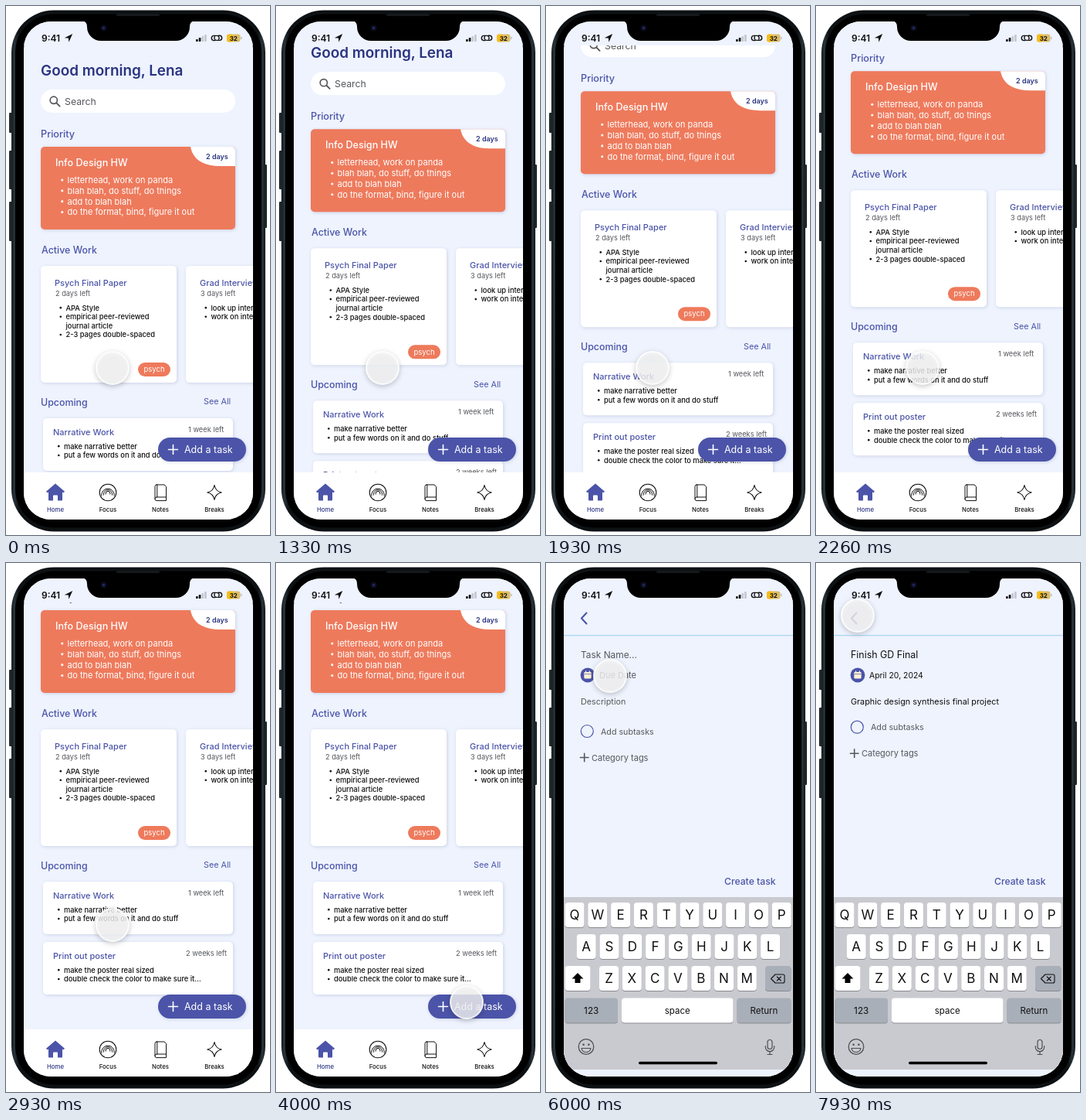
An HTML page that plays this animation: 342x684 px, repeating every 8 s.

```html
<!DOCTYPE html>
<html lang="en">
<head>
<meta charset="utf-8">
<title>Task planner demo</title>
<style>
html, body { margin: 0; width: 100%; height: 100%; overflow: hidden; background: #fff; }
svg { display: block; width: 100%; height: 100%; }
text { font-family: Inter, "Open Sans", sans-serif; white-space: pre; }
.card { filter: drop-shadow(1px 1.5px 2px rgba(70, 80, 130, .2)); }
.key { filter: drop-shadow(0 1px 0 #898b90); }
#touch { filter: drop-shadow(0 2px 3px rgba(0, 0, 0, .25)); }
</style>
</head>
<body>
<svg viewBox="0 0 342 684" xmlns="http://www.w3.org/2000/svg">
  <defs>
    <clipPath id="screen"><rect x="23" y="20" width="297" height="644" rx="35"/></clipPath>
    <linearGradient id="metal">
      <stop offset="0" stop-color="#161d20"/><stop offset=".012" stop-color="#29343a"/>
      <stop offset=".03" stop-color="#0d1113"/><stop offset=".97" stop-color="#0d1113"/>
      <stop offset=".988" stop-color="#29343a"/><stop offset="1" stop-color="#161d20"/>
    </linearGradient>
  </defs>
  <g id="body"></g>
  <g clip-path="url(#screen)">
    <rect x="23" y="20" width="297" height="644" fill="#eef3fe"/>
    <g id="home"><g id="feed"></g><g id="chrome"></g></g>
    <g id="task"></g>
  </g>
  <g id="status"></g>
  <g id="touch">
    <circle r="21" fill="#f8f8f8" fill-opacity=".8" stroke="#fff" stroke-opacity=".85" stroke-width="2"/>
  </g>
</svg>
<script>
const INDIGO = '#4b54a8', NAVY = '#2a3380', ORANGE = '#ee7a5c', GREY = '#55575c',
      INK = '#101012', PAPER = '#eef3fe', KEY_GREY = '#a9afb8';
const LOOP = 8000;
const $ = id => document.getElementById(id);

const text = (x, y, size, fill, str, weight = 400, anchor = 'start') =>
  `<text x="${x}" y="${y}" font-size="${size}" fill="${fill}" font-weight="${weight}" text-anchor="${anchor}">${str}</text>`;
const rect = (x, y, w, h, r, fill, cls = '') =>
  `<rect x="${x}" y="${y}" width="${w}" height="${h}" rx="${r}" fill="${fill}" class="${cls}"/>`;
const circle = (x, y, r, fill, extra = '') => `<circle cx="${x}" cy="${y}" r="${r}" fill="${fill}" ${extra}/>`;
const fillPath = (d, fill) => `<path d="${d}" fill="${fill}"/>`;
const line = (d, color, width = 1) =>
  `<path d="${d}" fill="none" stroke="${color}" stroke-width="${width}" stroke-linecap="round" stroke-linejoin="round"/>`;
const plus = (x, y, arm, color, width) => line(`M${x - arm} ${y}h${2 * arm}M${x} ${y - arm}v${2 * arm}`, color, width);
// A row starting with a space continues the bullet above it.
const bullets = (x, y, step, size, fill, rows, weight) => rows.map((row, i) =>
  (row[0] === ' ' ? '' : circle(x - 6.7, y + i * step - size * .36, size * .14, fill)) +
  text(x, y + i * step, size, fill, row.trim(), weight)).join('');

function drawBody() {
  const buttons = [[4, 138, 26], [4, 187, 50], [4, 253, 51], [334, 205, 82]];
  $('body').innerHTML =
    buttons.map(([x, y, h]) => rect(x, y, 4, h, 1.2, '#1f292d')).join('') +
    rect(7, 5.5, 329, 674, 55, 'url(#metal)') +
    rect(12, 10.5, 319, 664, 50, '#000') +
    rect(143, 10, 56, 3, 1.5, '#15191b');
}

function drawStatus() {
  const bars = [3, 5, 7, 9].map((h, i) => rect(246 + 3.7 * i, 46 - h, 2.7, h, .7, i < 2 ? INK : '#c3c7d0')).join('');
  const link = line('M271 44.6h-1.6a3.1 3.1 0 0 1 0-6.2h3.6a3.1 3.1 0 0 1 2.6 4.8', INK, 1.4);
  $('status').innerHTML =
    fillPath('M99 19q6 1 6 8a18 18 0 0 0 18 18h97a18 18 0 0 0 18-18q0-7 6-8z', '#000') +
    circle(126.5, 28.5, 4, '#0c0d1c') + circle(126.5, 28.5, 1.7, '#25276b') +
    text(46, 46, 12, INK, '9:41', 600) +
    fillPath('M86.2 36L75.8 41.2l5.1 .4 .5 5.1z', INK) + bars +
    link + `<g transform="rotate(180 273 41.4)">${link}</g>` +
    rect(286, 36.5, 17.5, 10, 3, '#dcbd68') + rect(286, 36.5, 8, 10, 3, '#f4bd1c') +
    rect(304.2, 39.7, 1.4, 3.6, .7, '#b9bcc4') + text(294.8, 44.6, 8, INK, '32', 700, 'middle');
}

function upcomingCard(y, title, due, dueX, rows) {
  return rect(48, y, 246, 68, 5, '#fff', 'card') +
    text(61, y + 22, 11, INDIGO, title, 500) + text(dueX, y + 17.8, 9.3, GREY, due) +
    bullets(75, y + 39.5, 11.8, 9.3, INK, rows, 500);
}

function activeCard(x, title, due, rows) {
  return rect(x, 336, 176, 151, 5, '#fff', 'card') +
    text(x + 18, 361.5, 11, INDIGO, title, 500) + text(x + 19, 375, 9.2, GREY, due) +
    bullets(x + 32.5, 393.5, 11.6, 9.3, INK, rows, 500);
}

function drawHome() {
  $('feed').innerHTML =
    text(45, 89.5, 18.9, NAVY, 'Good morning, Lena', 600) +
    rect(45, 108, 252, 30, 15, '#fff') +
    circle(61.8, 121.8, 4.6, 'none', `stroke="${GREY}" stroke-width="1.7"`) + line('M65.4 125.4l4.2 4.2', GREY, 1.9) +
    text(76, 127.7, 12.3, GREY, 'Search') +
    text(45, 169.5, 12.7, INDIGO, 'Priority', 500) +
    rect(45, 182, 252, 107, 5, ORANGE, 'card') +
    fillPath('M239 182h53a5 5 0 0 1 5 5v20h-20c-22 0-35-9-38-25z', '#fff') +
    text(259, 198, 9, NAVY, '2 days', 600) +
    text(64, 207, 12.6, '#fff', 'Info Design HW', 500) +
    bullets(79.5, 229, 13.8, 11, '#fff',
      ['letterhead, work on panda', 'blah blah, do stuff, do things', 'add to blah blah', 'do the format, bind, figure it out']) +
    text(46, 319.7, 12.4, INDIGO, 'Active Work', 500) +
    activeCard(45, 'Psych Final Paper', '2 days left',
      ['APA Style', 'empirical peer-reviewed', ' journal article', '2-3 pages double-spaced']) +
    rect(171, 461, 42, 18, 9, ORANGE) + text(192, 473.2, 9.5, '#fff', 'psych', 400, 'middle') +
    activeCard(233, 'Grad Interview', '3 days left', ['look up interview', 'work on interview']) +
    text(45, 517, 12.4, INDIGO, 'Upcoming', 500) + text(256, 515.3, 10.8, INDIGO, 'See All') +
    upcomingCard(533, 'Narrative Work', '1 week left', 236, ['make narrative better', 'put a few words on it and do stuff']) +
    upcomingCard(611, 'Print out poster', '2 weeks left', 233, ['make the poster real sized', 'double check the color to make sure it…']);

  const arches = [8.2, 5.5, 2.8].map(r =>
    line(`M${132 - r} ${630 + r * .4}v-1a${r} ${r} 0 0 1 ${2 * r} 0v1`, INK, 1)).join('');
  const tabs = [['Home', 64], ['Focus', 132], ['Notes', 200], ['Breaks', 270]];
  $('chrome').innerHTML =
    rect(23, 20, 297, 31, 0, PAPER) +
    rect(197, 558, 114, 31, 15.5, INDIGO, 'card') +
    plus(216.5, 573.5, 6, '#fff', 1.6) + text(231, 577.8, 12.5, '#fff', 'Add a task') +
    rect(23, 603, 297, 61, 0, '#fff') +
    fillPath('M64 617.5l12 10.2-1.5 1.8-1.5-1v10q0 1-1 1h-5v-6q0-1-1-1h-4q-1 0-1 1v6h-5q-1 0-1-1v-10l-1.5 1-1.5-1.8z', INDIGO) +
    circle(132, 629, 10.8, 'none', `stroke="${INK}" stroke-width="1.1"`) + arches +
    line('M195 619h10l2.5 2.5v13.5h-12.5q-2 0-2 2.3t2 2.3h12.5v-4.6M193 637.3v-16q0-2.3 2-2.3M195.8 619v16', INK, 1) +
    line('M270 619.5q1.4 8 9.2 9.5q-7.8 1.5-9.2 9.5q-1.4-8-9.2-9.5q7.8-1.5 9.2-9.5z', INK, 1.1) +
    tabs.map(([label, x], i) => text(x, 653.8, 7.8, i ? INK : NAVY, label, 500, 'middle')).join('');
}

function keyboard() {
  const key = (x, y, w, label, size = 17, fill = '#fff') =>
    rect(x, y, w, 32, 4, fill, 'key') + text(x + w / 2, y + 16 + size * .36, size, INK, label, 400, 'middle');
  const rows = [['QWERTYUIOP', 24.5, 439], ['ASDFGHJKL', 39.7, 480], ['ZXCVBNM', 69, 521]];
  return rect(23, 432, 297, 223, 0, '#c9cad0') +
    rows.map(([letters, x, y]) => [...letters].map((c, i) => key(x + i * 29.8, y, 25, c)).join('')).join('') +
    key(24.5, 521, 33, '') + fillPath('M41 530l7.5 7.5h-4v5.5h-7v-5.5h-4z', '#000') +
    key(284, 521, 33.5, '', 17, KEY_GREY) +
    line('M297 532h10q2 0 2 2v7q0 2-2 2h-10l-5.5-5.5zM299.3 535l5 5M304.3 535l-5 5', INK, 1.1) +
    key(24.5, 562.5, 68.5, '123', 11.8, KEY_GREY) + key(98, 562.5, 144.5, 'space', 11.5) +
    key(247.5, 562.5, 70, 'Return', 11.5, KEY_GREY) +
    circle(52, 625.5, 9.8, 'none', 'stroke="#4c5056" stroke-width="1.3"') +
    circle(48.6, 622.7, 1.3, '#4c5056') + circle(55.4, 622.7, 1.3, '#4c5056') +
    line('M46 627.5h12q-1 5-6 5t-6-5z', '#4c5056', 1.2) +
    `<rect x="287" y="616.5" width="6" height="12" rx="3" fill="none" stroke="#4c5056" stroke-width="1.2"/>` +
    line('M284.3 624.5v1.5a5.7 5.7 0 0 0 11.4 0v-1.5M290 632v3.5M287 635.5h6', '#4c5056', 1.2) +
    rect(120, 644.7, 102, 3.6, 1.8, '#000');
}

function drawTask() {
  $('task').innerHTML =
    rect(23, 20, 297, 644, 0, PAPER) +
    line('M52.5 64.5l-6.5 7 6.5 7', INDIGO, 2.1) + line('M23 93.7h297', '#a9d6f0', 1.2) +
    '<g id="name"></g><g id="date"></g><g id="about"></g>' +
    circle(54, 145, 9.4, INDIGO) + rect(49.3, 141, 9.4, 8.4, 1.3, '#fff3d6') +
    line('M51.6 139.8v1.5M56.4 139.8v1.5', '#fff3d6', 1.3) + line('M49.8 143.6h8.4', INDIGO, .7) +
    '<g id="extras">' +
    circle(53.3, 217.5, 8, 'none', `stroke="${INDIGO}" stroke-width="1.2"`) + text(71, 221.5, 10.7, GREY, 'Add subtasks') +
    plus(49.7, 251.5, 5.3, GREY, 1.6) + text(59, 255.5, 11, GREY, 'Category tags') + '</g>' +
    text(231, 416, 12.2, INDIGO, 'Create task', 500) + keyboard();
}

const smooth = (t, from, to) => {
  const p = Math.min(1, Math.max(0, (t - from) / (to - from)));
  return p * p * (3 - 2 * p);
};

// start, end, x, y of each glide of the touch point
const glides = [
  [3100, 3850, 247, 568], [4600, 5700, 83, 146], [6080, 6300, 83, 119],
  [6500, 6750, 88, 146], [6900, 7150, 80, 179], [7350, 7850, 54, 68]
];
const fields = [
  ['name', 6400, 45, 122.5, ['Task Name...', 11.9], ['Finish GD Final', 12.4]],
  ['date', 6850, 69, 149.3, ['Due Date', 11], ['April 20, 2024', 10.4]],
  ['about', 7250, 45, 183, ['Description', 10.8], ['Graphic design synthesis final project', 10.8]]
];

function render(t) {
  let x = 138, y = 468;
  for (const [from, to, nextX, nextY] of glides) {
    const p = smooth(t, from, to);
    x += (nextX - x) * p;
    y += (nextY - y) * p;
  }
  $('touch').setAttribute('transform', `translate(${x} ${y})`);
  $('feed').setAttribute('transform', `translate(0 ${-121 * smooth(t, 750, 2850)})`);
  $('task').setAttribute('opacity', smooth(t, 4050, 4250));
  for (const [id, at, fx, fy, empty, filled] of fields) {
    const done = t >= at, [str, size] = done ? filled : empty;
    $(id).innerHTML = text(fx, fy, size, done ? INK : GREY, str);
  }
  $('extras').setAttribute('transform', `translate(0 ${t >= 7250 ? -5.3 : 0})`);
}

drawBody();
drawStatus();
drawHome();
drawTask();
const start = performance.now();
function frame() {
  render((performance.now() - start) % LOOP);
  requestAnimationFrame(frame);
}
render(0);
requestAnimationFrame(frame);
</script>
</body>
</html>
```
